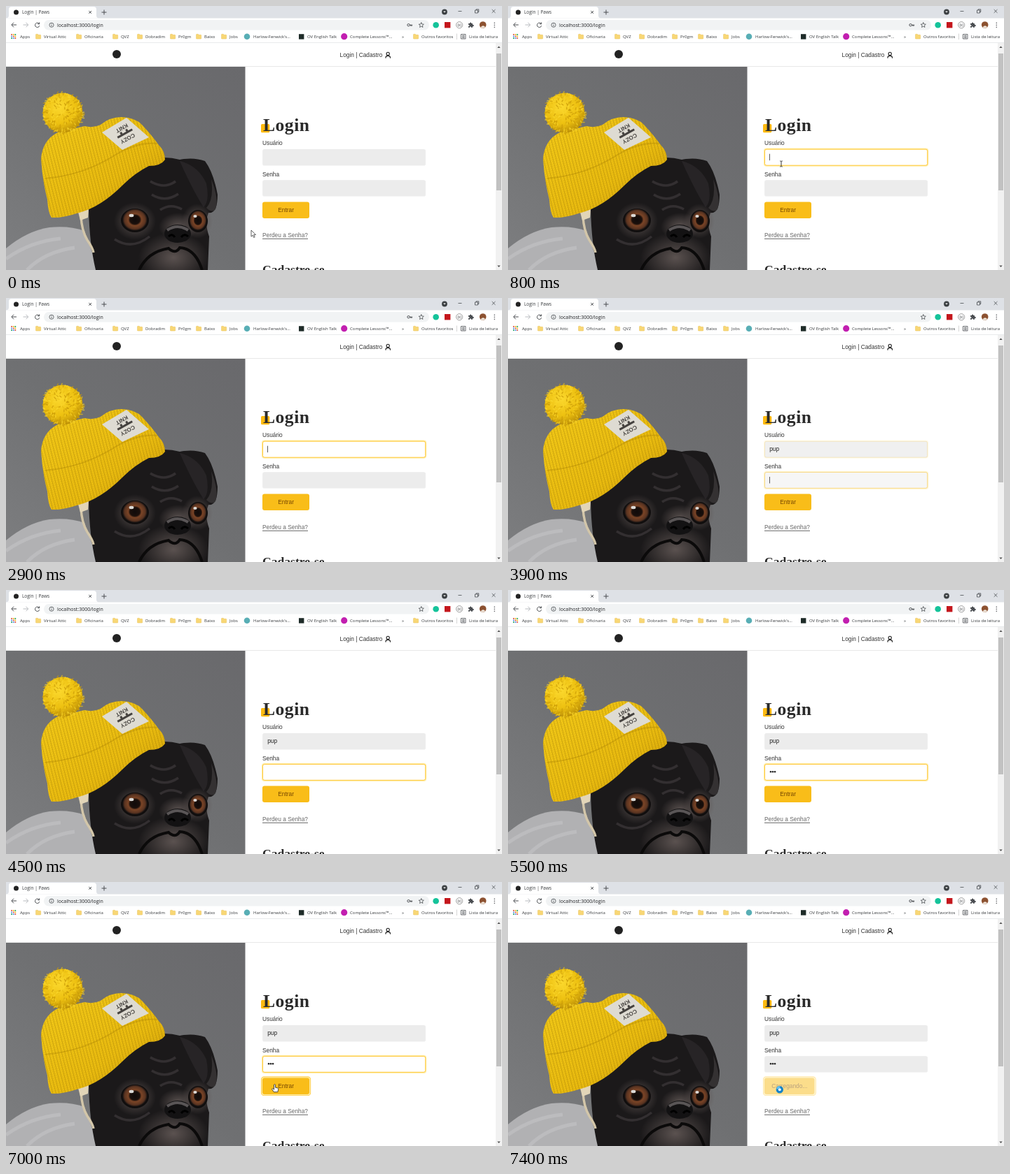
These frames come from a looping animation (708x378 px, 8 s). An HTML page:

```html
<!DOCTYPE html>
<html lang="pt-BR">
<head>
<meta charset="utf-8">
<title>Login | Paws</title>
<style>
html, body { margin: 0; width: 100%; height: 100%; overflow: hidden; background: #fff; }
svg { display: block; width: 708px; height: 378px; }
.ui { font-family: "Open Sans", "Noto Sans", sans-serif; fill: #35383b; }
.mark { font-size: 6px; }
.page { font: 8.35px "Liberation Sans", Arial, sans-serif; fill: #333; }
.title { font-family: "Liberation Serif", "Times New Roman", serif; font-weight: 700; fill: #2a2a2a; }
.line { fill: none; stroke: #4a4d51; stroke-width: 1; }
.thin { stroke-width: .8; }
.user { stroke: #222; stroke-width: 1.1; }
.box { fill: #fff; stroke: #fb1; stroke-width: .8; }
</style>
</head>
<body>
<svg viewBox="0 0 708 378" xmlns="http://www.w3.org/2000/svg">
<defs>
  <linearGradient id="wall" x1="1" y1="0" x2="0" y2="1">
    <stop offset="0" stop-color="#69696c"/><stop offset=".5" stop-color="#6f7072"/><stop offset="1" stop-color="#7d7e80"/>
  </linearGradient>
  <linearGradient id="wool" x1="0" y1="0" x2="1" y2="1">
    <stop offset="0" stop-color="#f5cd1a"/><stop offset=".6" stop-color="#ebbd10"/><stop offset="1" stop-color="#c4960a"/>
  </linearGradient>
  <radialGradient id="pom" cx=".42" cy=".35" r=".65">
    <stop offset="0" stop-color="#fbd82d"/><stop offset=".65" stop-color="#edc010"/><stop offset="1" stop-color="#bd9108"/>
  </radialGradient>
  <radialGradient id="eye">
    <stop offset="0" stop-color="#100b0a"/><stop offset=".4" stop-color="#1a0f0b"/>
    <stop offset=".55" stop-color="#7a4426"/><stop offset=".85" stop-color="#5a3421"/><stop offset="1" stop-color="#1a1413"/>
  </radialGradient>
  <radialGradient id="glow">
    <stop offset="0" stop-color="#5b5250"/><stop offset="1" stop-color="#5b5250" stop-opacity="0"/>
  </radialGradient>
  <pattern id="knit" width="4.4" height="3" patternUnits="userSpaceOnUse" patternTransform="rotate(-14)">
    <path d="M0 0L2.2 1.5L4.4 0" fill="none" stroke="#b08400" stroke-width=".6"/>
    <path d="M0 0V3" stroke="#866300" stroke-width="1.6"/>
  </pattern>
  <path id="hat" d="M50 219Q52 192 74 181L112 172Q125 175 135 170Q148 159 165 159Q185 160 194 170Q208 185 218 199Q227 208 227 220Q221 229 204 229Q184 239 166 257Q135 288 104 296Q80 304 65 303Q60 296 59 277Q52 250 50 219Z"/>
  <clipPath id="frame"><rect y="87" width="341.5" height="291"/></clipPath>
  <path id="folder" d="M0 1.2Q0 .5 .7 .5H2.8L3.7 1.5H6.5Q7.2 1.5 7.2 2.2V6.6Q7.2 7.3 6.5 7.3H.7Q0 7.3 0 6.6Z" fill="#f8d775" stroke="#e3b84d" stroke-width=".4"/>
</defs>

<rect width="708" height="378" fill="#fff"/>

<!-- browser -->
<g class="ui">
  <rect width="708" height="17.5" fill="#dee1e6"/>
  <path d="M0 17.5Q4 17.5 4 13.5V5Q4 1 8 1H125Q129 1 129 5V13.5Q129 17.5 133 17.5Z" fill="#fff"/>
  <circle cx="14.5" cy="9" r="3.5" fill="#222"/>
  <text x="23" y="11.3" font-size="6.5">Login | Paws</text>
  <path class="line" d="M118.3 7L122 10.7M122 7L118.3 10.7M136.5 9H143.5M140 5.5V12.5"/>
  <circle cx="626" cy="8.5" r="3.9" fill="#3c4043"/><path d="M624.2 7.6L626 9.6L627.8 7.6Z" fill="#fff"/>
  <path class="line thin" d="M645.5 7.5H650.5M669.5 6H673.5V10H669.5ZM671 6V4.8H674.8V8.6H673.5M693.7 5L698.5 9.8M698.5 5L693.7 9.8"/>

  <rect x="54" y="20" width="550" height="14.5" rx="7.2" fill="#f1f3f4"/>
  <path class="line" d="M15 27H8M11 23.7L7.8 27L11 30.3"/>
  <path class="line" style="stroke:#b9bcc0" d="M24.5 27H31.5M28.5 23.7L31.7 27L28.5 30.3"/>
  <path class="line" d="M47.3 25.4A3.2 3.2 0 1 0 47.8 28.2M47.7 23.4V25.8H45.2"/>
  <circle class="line thin" cx="65" cy="27.2" r="3.1"/><path class="line thin" d="M65 26.7V29M65 25.2V26"/>
  <text x="73" y="29.6" font-size="7" fill="#202124">localhost:3000/login</text>
  <g id="key"><circle class="line" cx="574.6" cy="27.2" r="1.7"/><path class="line" d="M576.3 27.2H580.2M579 27.2V29M577.6 27.2V28.6"/></g>
  <path class="line thin" d="M592.8 23.5L593.8 26L596.4 26.2L594.4 27.9L595 30.5L592.8 29.1L590.6 30.5L591.2 27.9L589.2 26.2L591.8 26Z"/>
  <circle cx="613.7" cy="27.2" r="4.3" fill="#15c39a"/>
  <rect x="626" y="23" width="8.4" height="8.4" fill="#c4161c"/>
  <circle cx="647.2" cy="27.2" r="4.6" fill="#fff" stroke="#777" stroke-width=".7"/><text x="644.4" y="29" font-size="5">(x)</text>
  <path d="M660 25H662A1.2 1.2 0 1 1 664.3 25H666V27A1.2 1.2 0 1 1 666 29V30.8H663.9A1 1 0 1 0 662 30.8H660V28.8A1 1 0 1 0 660 27Z" fill="#4a4d51"/>
  <circle cx="680.7" cy="27" r="4.8" fill="#8c5130"/><path d="M677.5 30.5Q681 26 684.2 30.2Q681 33 677.5 30.5Z" fill="#eee4d8"/>
  <g fill="#4a4d51"><circle cx="697.3" cy="24.2" r=".8"/><circle cx="697.3" cy="27.2" r=".8"/><circle cx="697.3" cy="30.2" r=".8"/></g>

  <g id="apps"></g>
  <g id="marks" class="mark"><text x="20" y="45.8">Apps</text></g>
  <circle cx="344" cy="43.7" r="4.3" fill="#58aeb5"/>
  <rect x="418" y="40.2" width="7.4" height="7.4" fill="#1e2b28"/>
  <circle cx="482.7" cy="43.7" r="4.6" fill="#c21fb0"/>
  <path class="line thin" d="M643.5 39.5V48" style="stroke:#ccc"/>
  <path class="line thin" d="M649.5 40.5H656V47H649.5ZM651 42.4H654.6M651 43.9H654.6M651 45.4H654.6"/>
  <path d="M0 52.5H708" stroke="#e3e5e8" stroke-width=".8"/>
</g>

<!-- page header and scrollbar -->
<path d="M0 86.5H699" stroke="#e8e8e8"/>
<circle cx="158" cy="69" r="6" fill="#222"/>
<g class="page"><text x="476.6" y="73" font-size="8.3">Login | Cadastro</text></g>
<path class="line user" d="M542 74.8V73.7Q542 71.4 545.2 71.4Q548.5 71.4 548.5 73.7V74.8"/>
<circle class="line user" cx="545.2" cy="68.4" r="2.1"/>
<rect x="699" y="53" width="9" height="325" fill="#f1f1f1"/>
<rect x="700" y="68" width="7" height="196" fill="#c1c1c1"/>
<path d="M701.3 60L703.5 57.6L705.7 60ZM701.3 371.5L703.5 374L705.7 371.5Z" fill="#505050"/>

<!-- picture -->
<g clip-path="url(#frame)">
  <rect y="87" width="342" height="291" fill="url(#wall)"/>
  <path d="M0 347Q30 322 62 317Q90 314 112 322L132 378H0Z" fill="#b1b1b3"/>
  <path d="M0 362Q35 337 78 333M30 378Q55 352 98 346" fill="none" stroke="#c4c4c6" stroke-width="5" opacity=".6"/>
  <path d="M118 290L185 226Q218 212 248 220Q268 216 284 222Q296 238 302 270Q302 298 289 296Q283 310 290 330L288 378H128Q119 340 118 290Z" fill="#1b191a"/>
  <path d="M248 222Q274 228 286 254Q291 280 282 288Q266 263 248 222Z" fill="#272426"/>
  <path d="M293 248Q304 275 299 291Q294 297 286 289Q297 277 293 248Z" fill="#343132"/>
  <g fill="url(#glow)">
    <ellipse cx="239" cy="360" rx="50" ry="36"/>
    <ellipse cx="184" cy="308" rx="30" ry="27"/>
    <ellipse cx="273" cy="308" rx="22" ry="25"/>
    <ellipse cx="246" cy="316" rx="28" ry="20"/>
  </g>
  <path d="M206 251Q226 263 242 251M208 270Q227 282 246 269M220 292Q235 282 251 291M155 334Q180 350 205 330" fill="none" stroke="#3b3739" stroke-width="3.5" opacity=".75"/>
  <path d="M190 378Q202 352 232 347Q242 356 248 346Q270 347 280 378" fill="none" stroke="#0b0a0a" stroke-width="4"/>
  <ellipse cx="245" cy="326" rx="19" ry="13" fill="#131213"/>
  <path d="M230 321Q245 311 260 321" fill="none" stroke="#595556" stroke-width="4"/>
  <path d="M232 330Q237 325 241 331M250 331Q255 325 260 330" fill="none" stroke="#000" stroke-width="3"/>
  <ellipse cx="184" cy="307" rx="20" ry="17" fill="#100e0e"/>
  <ellipse cx="184" cy="306" rx="17.5" ry="15.5" fill="url(#eye)"/>
  <ellipse cx="274" cy="308" rx="14" ry="16" fill="#100e0e"/>
  <ellipse cx="274" cy="307" rx="12" ry="14" fill="url(#eye)"/>
  <ellipse cx="179" cy="300" rx="3.4" ry="2.2" fill="#dcdad7"/><ellipse cx="270" cy="301" rx="2.6" ry="2" fill="#dcdad7"/>
  <path d="M107 300Q108 322 116 335Q124 347 125 353" fill="none" stroke="#d3c6a9" stroke-width="3.4"/>
  <path d="M103 295L118 291L117 303L106 307Z" fill="#e2d5b8"/>
  <use href="#hat" fill="url(#wool)"/>
  <use href="#hat" fill="url(#knit)" opacity=".4"/>
  <path d="M56 247Q112 242 158 212Q190 194 216 197" fill="none" stroke="#a77e04" stroke-width="2" opacity=".35"/>
  <circle cx="81" cy="153" r="28.5" fill="url(#pom)"/>
  <g id="fuzz" fill="none" stroke-linecap="round"></g>
  <path d="M137 181L172 160L204 188L166 206Z" fill="#dedbd2"/>
  <g transform="translate(170 183) rotate(151)" fill="#45423f" font-family="Liberation Sans, sans-serif" font-weight="700" font-size="8" text-anchor="middle">
    <text y="-5">COZY</text><text y="12">KNIT</text>
    <path d="M-12 -1H12V2H6V5H3V2H-3V5H-6V2H-12Z"/>
  </g>
</g>

<!-- form -->
<rect x="364" y="169" width="12.3" height="12.3" rx="1.6" fill="#fb1"/>
<text class="title" x="367" y="179" font-size="25.6" letter-spacing=".5">Login</text>
<text class="title" x="366" y="383.3" font-size="17.6">Cadastre-se</text>
<g class="page">
  <text x="366" y="199">Usuário</text>
  <text x="366" y="243.5">Senha</text>
  <text x="366" y="331.3" fill="#666">Perdeu a Senha?</text>
  <path d="M366 333.3H431" stroke="#555" stroke-width=".9"/>
  <rect x="366.2" y="204.9" width="232.8" height="23.6" rx="2.6" fill="#ececec"/>
  <rect x="366.2" y="249.2" width="232.8" height="23.4" rx="2.6" fill="#ececec"/>
  <g id="userOn"><rect x="364.9" y="203.6" width="235.4" height="26.2" rx="4" fill="#fea"/><rect class="box" x="366.5" y="205.2" width="232.2" height="23" rx="2.6"/></g>
  <g id="passOn"><rect x="364.9" y="247.9" width="235.4" height="26" rx="4" fill="#fea"/><rect class="box" x="366.5" y="249.5" width="232.2" height="22.8" rx="2.6"/></g>
  <text id="user" x="373.2" y="219.2" fill="#222"></text>
  <g id="dots" fill="#222"><circle cx="375" cy="260.3" r="1.25"/><circle cx="378" cy="260.3" r="1.25"/><circle cx="381" cy="260.3" r="1.25"/></g>
  <rect id="caret" width=".8" height="9.4" fill="#333"/>
  <g id="button">
    <g id="ring"><rect class="wide" x="364.1" y="278.6" width="71" height="27.5" rx="4.2" fill="#fb1"/><rect class="wide" x="364.7" y="279.2" width="69.8" height="26.3" rx="3.7" fill="#fea"/></g>
    <rect class="wide" x="366" y="280.6" width="67" height="23.4" rx="3" fill="#f9bd19"/>
    <text id="label" y="295.2" text-anchor="middle" style="fill:#764701"></text>
  </g>
</g>

<!-- pointers -->
<g id="arrow"><path d="M0 0V9.2L2.2 7.2L3.7 10.5L5.2 9.8L3.7 6.6H6.5Z" fill="#fff" stroke="#222" stroke-width=".7"/></g>
<g id="beam"><path d="M-1.8 -4H-.5L0 -3.5L.5 -4H1.8M0 -3.5V3.5M-1.8 4H-.5L0 3.5L.5 4H1.8" fill="none" stroke="#222" stroke-width=".9"/></g>
<g id="hand"><path d="M-1 0Q0 -1 1 0V4L4.4 4.8Q5.4 5.2 5.2 6.5L4.4 10.5H-1.2L-4 6.2Q-3.5 4.8 -2.2 5.8L-1 7Z" fill="#fff" stroke="#222" stroke-width=".8" stroke-linejoin="round"/></g>
<g id="busy"><circle r="3.6" fill="#fff" stroke="#1583c9" stroke-width="3.2"/><path d="M-3.5 -.8A3.6 3.6 0 0 1 .5 -3.6" fill="none" stroke="#63c3f2" stroke-width="2.4"/></g>
</svg>
<script>
const $ = id => document.getElementById(id);
const LOOP = 8000, STEP = 100;
const NS = "http://www.w3.org/2000/svg";

function add(parent, tag, attrs, text) {
  const el = document.createElementNS(NS, tag);
  for (const k in attrs) el.setAttribute(k, attrs[k]);
  if (text) el.textContent = text;
  parent.append(el);
}

// x of label, text, folder flag
[[54, "Virtual Attic", 1], [112, "Oficinaria", 1], [164, "QVZ", 1], [199, "Dobradim", 1],
 [246, "Pr0gm", 1], [283, "Baixo", 1], [319, "Jobs", 1], [353, "Harlow-Fenwick's..."],
 [430, "OV English Talk"], [491, "Complete Lessons™..."], [565, "»"],
 [593, "Outros favoritos", 1], [661, "Lista de leitura"]].forEach(([x, name, folder]) => {
  if (folder) add($("marks"), "use", { href: "#folder", x: x - 11.5, y: 39.8 });
  add($("marks"), "text", { x, y: 45.8 }, name);
});
const dotColors = ["#db4437", "#f4b400", "#0f9d58", "#4285f4"];
for (let i = 0; i < 9; i++)
  add($("apps"), "rect", { x: 7.3 + i % 3 * 2.6, y: 40 + Math.floor(i / 3) * 2.6, width: 1.7, height: 1.7, fill: dotColors[i % 4] });

let seed = 7;
const rnd = () => (seed = seed * 16807 % 2147483647) / 2147483647;
for (let i = 0; i < 260; i++) {
  const a = rnd() * Math.PI * 2, r = 29 * Math.sqrt(rnd());
  const x = 81 + r * Math.cos(a), y = 153 + r * Math.sin(a), b = a + rnd() * 2 - 1;
  add($("fuzz"), "path", {
    d: `M${x} ${y}l${2.6 * Math.cos(b)} ${2.6 * Math.sin(b)}`,
    stroke: ["#f9d62b", "#c99a08", "#eabf14"][i % 3], "stroke-width": 1.5, opacity: .7
  });
}

// pointer stops: time, x, y, shape
const path = [
  [0, 350, 321, "arrow"], [100, 351, 319, "arrow"], [300, 358, 298, "arrow"], [400, 368, 268, "beam"],
  [500, 378, 245, "beam"], [600, 386, 230, "beam"], [700, 390, 226, "beam"], [1000, 390, 226, "beam"],
  [1100, 396, 252, "beam"], [1200, 410, 310, "arrow"], [1300, 417, 345, "arrow"], [1700, 417, 345, "arrow"],
  [2400, 422, 390, ""], [6200, 424, 390, ""], [6300, 420, 345, "arrow"], [6400, 410, 322, "arrow"],
  [6500, 396, 302, "hand"], [6800, 383.5, 290.2, "hand"], [7100, 387.8, 297.2, "busy"], [8000, 387.8, 297.2, "busy"]
];
const shapes = ["arrow", "beam", "hand", "busy"];

function pointer(t) {
  let i = 0;
  while (i < path.length - 2 && path[i + 1][0] <= t) i++;
  const [t0, x0, y0, kind] = path[i], [t1, x1, y1, next] = path[i + 1];
  const k = next === "busy" ? 0 : (t - t0) / (t1 - t0);
  for (const s of shapes) $(s).style.display = s === kind ? "" : "none";
  if (kind) $(kind).setAttribute("transform", `translate(${x0 + (x1 - x0) * k} ${y0 + (y1 - y0) * k})`);
}

const clamp = v => Math.max(0, Math.min(1, v));
const fade = (t, on, off = LOOP) => clamp((t - on) / 200) - clamp((t - off) / 200);
const count = (t, times) => times.filter(s => t >= s).length;
const show = (id, on) => $(id).style.visibility = on ? "visible" : "hidden";

const userKeys = [3100, 3500, 3600], passKeys = [4700, 4800, 5000];
const caretOn = [[700, 1300], [1800, 2400], [2900, 4400], [4700, 5500], [6100, 6600]];
const wide = [...document.querySelectorAll(".wide")].map(el => [el, +el.getAttribute("width")]);

function draw(t) {
  const typed = count(t, userKeys), hidden = count(t, passKeys), inPass = t >= 3900, busy = t >= 7100;
  $("userOn").setAttribute("opacity", fade(t, 550, 3750));
  $("passOn").setAttribute("opacity", fade(t, 3790, 7050));
  $("ring").setAttribute("opacity", fade(t, 6450));
  $("user").textContent = "pup".slice(0, typed);
  [...$("dots").children].forEach((dot, i) => dot.style.display = i < hidden ? "" : "none");
  $("caret").setAttribute("x", 373.1 + (inPass ? hidden * 3.1 : typed * 4.64));
  $("caret").setAttribute("y", inPass ? 256 : 211.7);
  show("caret", caretOn.some(([a, b]) => t >= a && t < b));
  show("key", t < 3200 || t >= 4900);
  for (const [el, w] of wide) el.setAttribute("width", w + (busy ? 4.5 : 0));
  $("button").setAttribute("opacity", busy ? .5 : 1);
  $("label").textContent = busy ? "Carregando..." : "Entrar";
  $("label").setAttribute("x", busy ? 401.8 : 399.6);
  pointer(t);
}

const start = performance.now();
function tick() {
  const t = (performance.now() - start) % LOOP;
  draw(Math.floor(t / STEP) * STEP);
  requestAnimationFrame(tick);
}
tick();
</script>
</body>
</html>
```
